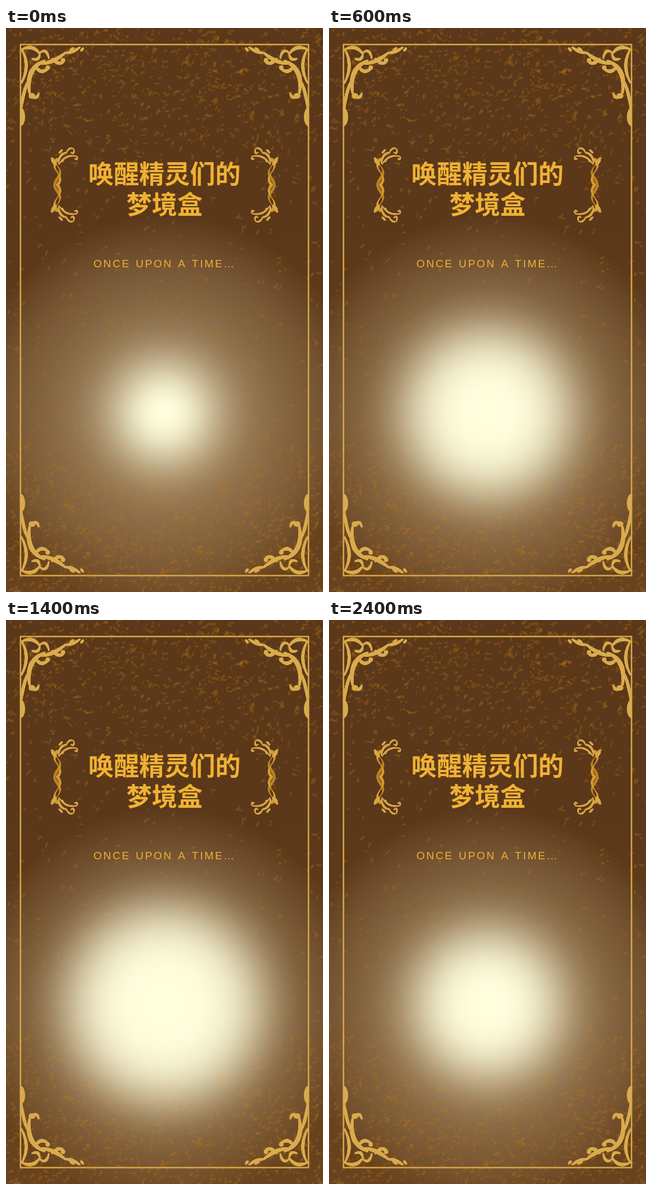
An HTML page with a canvas that plays this animation: 562 px wide and 997 px high, repeating every 2.6 s.

```html
<!DOCTYPE html>
<html lang="zh">
<head>
<meta charset="utf-8">
<style>
  html, body { margin: 0; width: 100%; height: 100%; overflow: hidden; background: #5a3819; }
  canvas { display: block; }
</style>
</head>
<body>
<canvas id="stage" width="562" height="997"></canvas>
<script>
const W = 562, H = 997, LOOP = 2600, PEAK = 1200;
const LIGHT = { x: 281, y: 680, reach: 350 };
const stage = document.getElementById('stage').getContext('2d');

function layer(paint) {
  const canvas = document.createElement('canvas');
  canvas.width = W;
  canvas.height = H;
  paint(canvas.getContext('2d'));
  return canvas;
}

// Radial light whose opacity is a function of the distance from its centre
function shine(ctx, rgb, opacityAt) {
  const { x, y, reach } = LIGHT, stops = 40;
  const fill = ctx.createRadialGradient(x, y, 0, x, y, reach);
  for (let i = 0; i <= stops; i++) {
    const opacity = opacityAt(reach * i / stops).toFixed(4);
    fill.addColorStop(i / stops, `rgba(${rgb},${opacity})`);
  }
  ctx.fillStyle = fill;
  ctx.fillRect(0, 0, W, H);
}

function seededRandom(seed) {
  return () => (seed = seed * 16807 % 2147483647) / 2147483647;
}

function fleckDensity(x, y) {
  const top = 1 - Math.max(0, y - 110) / 190;
  const bottom = (y - 640) / 180;
  const side = Math.abs(x - W / 2) > 250 ? .25 : .1;
  return Math.min(1, Math.max(side, top, bottom));
}

function drawFlecks(ctx) {
  const random = seededRandom(4711);
  ctx.fillStyle = 'rgba(185,118,24,.28)';
  for (let i = 0; i < 4200; i++) {
    const x = random() * W, y = random() * H;
    const length = 2 + 5 * random() ** 1.5, width = 1 + random() * 2;
    const angle = (random() - .6) * 2.4, bend = (random() - .5) * 9;
    if (random() > fleckDensity(x, y)) continue;
    ctx.save();
    ctx.translate(x, y);
    ctx.rotate(angle);
    ctx.beginPath();
    ctx.moveTo(-length, 0);
    ctx.quadraticCurveTo(0, bend - width, length, -width / 2);
    ctx.lineTo(length * .7, width);
    ctx.quadraticCurveTo(0, bend + width * 1.4, -length, width * .7);
    ctx.fill();
    ctx.restore();
  }
}

function dot(ctx, x, y, rx, ry = rx, turn = 0) {
  ctx.beginPath();
  ctx.ellipse(x, y, rx, ry, turn, 0, 2 * Math.PI);
  ctx.fill();
}

// Quadratic stroke that swells towards its middle
function vine(ctx, x0, y0, cx, cy, x1, y1, thickness) {
  for (let t = 0; t <= 1; t += .01) {
    const u = 1 - t;
    dot(ctx,
      u * u * x0 + 2 * u * t * cx + t * t * x1,
      u * u * y0 + 2 * u * t * cy + t * t * y1,
      thickness * (.5 + .5 * Math.sin(Math.PI * t)));
  }
}

function fourWays(ctx, axisY, paint) {
  for (const sx of [1, -1]) {
    for (const sy of [1, -1]) {
      ctx.save();
      ctx.translate(W / 2, axisY);
      ctx.scale(sx, sy);
      ctx.translate(-W / 2, -axisY);
      paint(ctx);
      ctx.restore();
    }
  }
}

function corner(ctx) {
  ctx.fillStyle = '#d9ab4e';
  // scroll in the angle
  vine(ctx, 28, 38, 48, 28, 60, 46, 3);
  vine(ctx, 60, 46, 58, 60, 46, 54, 2.5);
  vine(ctx, 28, 38, 44, 66, 27, 98, 2.8);
  // hanging stem and its curls
  vine(ctx, 68, 58, 34, 72, 42, 116, 4);
  dot(ctx, 46, 120, 6, 5);
  vine(ctx, 46, 122, 56, 126, 58, 115, 2.5);
  vine(ctx, 52, 66, 60, 84, 76, 71, 3);
  dot(ctx, 74, 70, 4);
  // reaching stem and its leaves
  vine(ctx, 62, 63, 84, 62, 106, 43, 3.4);
  vine(ctx, 104, 44, 118, 44, 131, 34, 2.8);
  vine(ctx, 82, 54, 94, 68, 103, 58, 3);
  dot(ctx, 101, 57, 4);
  vine(ctx, 60, 44, 72, 34, 76, 54, 2.4);
  dot(ctx, 135, 38, 4.5, 2.5, -.9);
  dot(ctx, 117, 37, 5, 2, -.5);
  // side leaf and bud
  vine(ctx, 40, 92, 30, 112, 27, 146, 2.8);
  ctx.beginPath();
  ctx.ellipse(25, 157, 9, 17, 0, -Math.PI / 2, Math.PI / 2);
  ctx.fill();
}

function bracket(ctx) {
  // twisted stem
  for (const [color, phase] of [['#b98224', 1.6], ['#d39c33', 0]]) {
    ctx.fillStyle = color;
    for (let y = 232; y <= 278; y += .4) {
      const swing = (y - 232) / 46 * 2 * Math.PI + phase;
      dot(ctx, 91 - 5 * Math.sin(swing), y, 1.6 + .8 * Math.cos(swing));
    }
  }
  // curls and leaves
  ctx.fillStyle = '#d7a64a';
  vine(ctx, 93, 239, 94, 222, 108, 220, 1.9);
  vine(ctx, 106, 222, 112, 209, 120, 214, 1.4);
  vine(ctx, 120, 214, 122, 224, 115, 220, 1.4);
  vine(ctx, 94, 241, 106, 222, 126, 227, 1.6);
  vine(ctx, 126, 227, 127, 234, 122, 231, 1.4);
  dot(ctx, 100, 235, 3, 2, -.6);
  dot(ctx, 97, 218, 5, 2, -.8);
  dot(ctx, 85, 237, 7, 3.4, .9);
  dot(ctx, 82, 231, 3, 2, .5);
}

function drawText(ctx) {
  ctx.fillStyle = '#f0b134';
  ctx.textAlign = 'center';
  ctx.font = '700 45px "Noto Sans CJK SC", "Noto Sans CJK", sans-serif';
  ctx.fillText('唤醒精灵们的', 281, 275);
  ctx.fillText('梦境盒', 281, 329);
  ctx.textAlign = 'left';
  ctx.font = '19px "Liberation Sans", Arial, sans-serif';
  ctx.letterSpacing = '2.7px';
  ctx.wordSpacing = '1.3px';
  ctx.fillText('ONCE UPON A TIME…', 155, 423);
}

const background = layer(ctx => {
  ctx.fillStyle = '#5a3819';
  ctx.fillRect(0, 0, W, H);
  const floor = ctx.createLinearGradient(0, 350, 0, H);
  floor.addColorStop(0, 'rgba(125,83,38,0)');
  floor.addColorStop(1, 'rgba(125,83,38,.4)');
  ctx.fillStyle = floor;
  ctx.fillRect(0, 350, W, H - 350);
  shine(ctx, '232,210,166', r => .42 * (1 - (r / LIGHT.reach) ** 2));
  drawFlecks(ctx);
});

const foreground = layer(ctx => {
  ctx.strokeStyle = '#d5a649';
  ctx.lineWidth = 2.6;
  ctx.strokeRect(25.7, 29.2, 510.6, 938.8);
  fourWays(ctx, H / 2, corner);
  fourWays(ctx, 277.5, bracket);
  drawText(ctx);
});

// The light changes in steps: every 200 ms while it grows, more slowly after the peak
function heldTime(time) {
  if (time < PEAK) return Math.floor(time / 200) * 200;
  return [2400, 2200, 1800, PEAK].find(step => step <= time);
}

function glowStrength(time) {
  const fromPeak = (time - PEAK) / PEAK;
  return time < PEAK ? Math.cos(fromPeak * Math.PI / 2) : 1 - fromPeak ** 2 / 2;
}

const start = performance.now();

function render() {
  const strength = glowStrength(heldTime((performance.now() - start) % LOOP));
  const radius = 98 + 82 * strength, steepness = 2.2 + 1.8 * strength;
  stage.drawImage(background, 0, 0);
  shine(stage, '255,254,221', r => Math.exp(-((r / radius) ** steepness)));
  stage.drawImage(foreground, 0, 0);
  requestAnimationFrame(render);
}
render();
</script>
</body>
</html>
```
